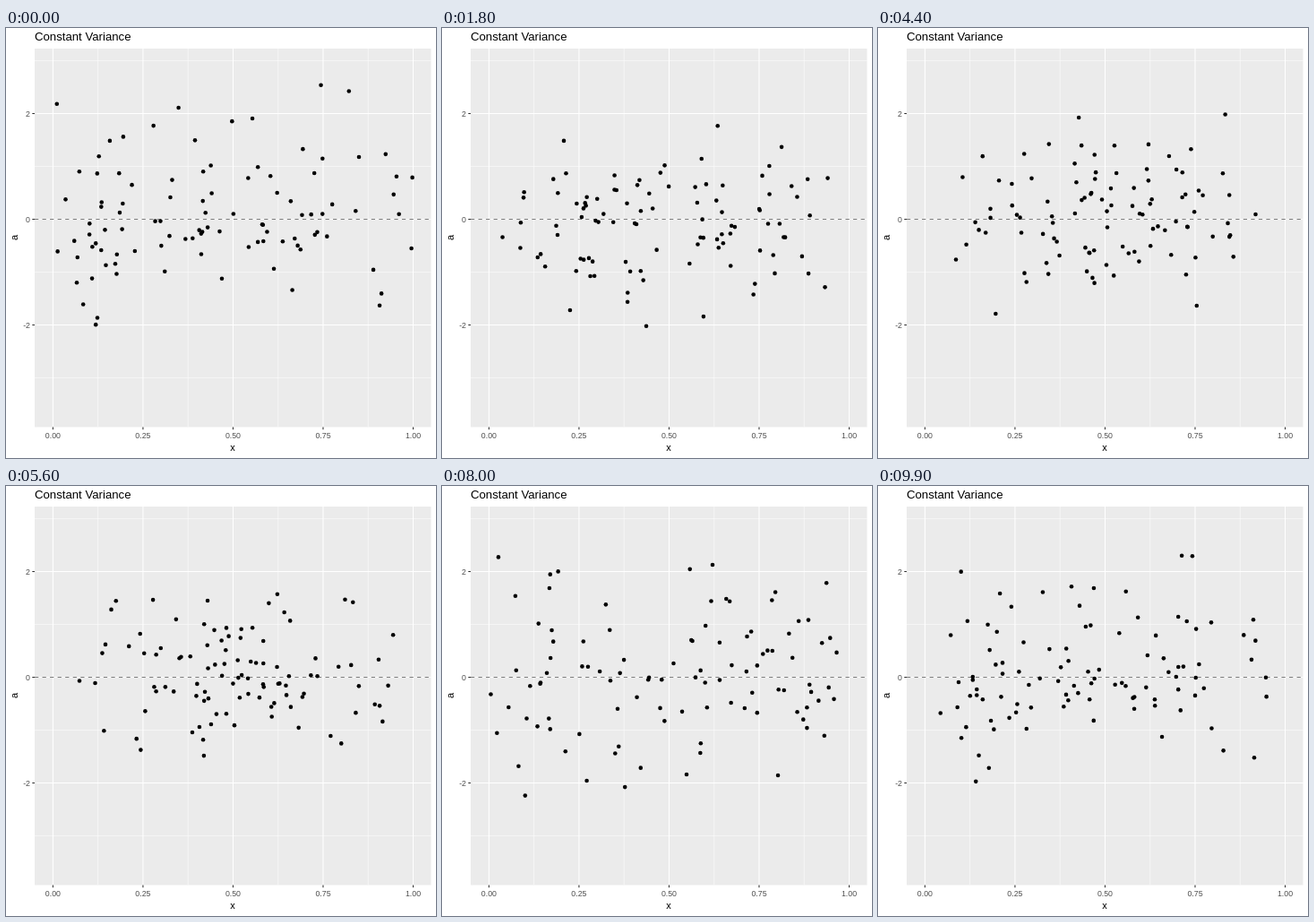
Recreate the animation shown at these times as an HTML page with a canvas. Size 480 px wide and 480 px high, loop 10 s.

```html
<!DOCTYPE html>
<html lang="en">
<head>
<meta charset="utf-8">
<title>Constant Variance</title>
<style>
  html, body { margin: 0; width: 100%; height: 100%; overflow: hidden; background: #fff; }
  canvas { display: block; }
</style>
</head>
<body>
<canvas id="plot" width="480" height="480"></canvas>
<script>
const ctx = document.getElementById('plot').getContext('2d');
const POINTS = 100, STATES = 10, FRAME_MS = 100, FRAMES = 100;
const panel = { left: 32, top: 23, right: 474.5, bottom: 445.5 };
const px = x => 52.4 + 402.1 * x;
const py = y => 213.5 - 59 * y;

let seed = 20177;
const random = () => (seed = seed * 16807 % 2147483647) / 2147483647;
const normal = () => Math.sqrt(-2 * Math.log(random())) * Math.cos(2 * Math.PI * random());

// Each state is a fresh sample: uniform in x, standard normal in y
const clamp = y => Math.max(-3.6, Math.min(2.9, y));
const sample = () => Array.from({ length: POINTS }, () => [px(random()), py(clamp(normal()))]);
const states = Array.from({ length: STATES }, sample);

function line(x1, y1, x2, y2, color, width = 1.07) {
  ctx.strokeStyle = color;
  ctx.lineWidth = width;
  ctx.beginPath();
  ctx.moveTo(x1, y1);
  ctx.lineTo(x2, y2);
  ctx.stroke();
}

function text(label, x, y, size, color, align) {
  ctx.font = `${size}px "Liberation Sans", Arial, sans-serif`;
  ctx.fillStyle = color;
  ctx.textAlign = align;
  ctx.fillText(label, x, y);
}

function drawAxes() {
  const { left, top, right, bottom } = panel;
  const vertical = (x, width) => line(px(x), top, px(x), bottom, '#fff', width);
  const horizontal = (y, width) => line(left, py(y), right, py(y), '#fff', width);

  ctx.fillStyle = '#fff';
  ctx.fillRect(0, 0, 480, 480);
  ctx.fillStyle = '#ebebeb';
  ctx.fillRect(left, top, right - left, bottom - top);

  for (let x = 0.125; x < 1; x += 0.25) vertical(x, 0.53);
  for (let y = -3; y <= 3; y += 2) horizontal(y, 0.53);
  for (let x = 0; x <= 1; x += 0.25) {
    vertical(x);
    line(px(x), bottom, px(x), bottom + 2.7, '#333');
    text(x.toFixed(2), px(x), 458, 8.8, '#4d4d4d', 'center');
  }
  for (let y = -2; y <= 2; y += 2) {
    horizontal(y);
    line(left - 2.7, py(y), left, py(y), '#333');
    text(y, 27, py(y) + 3.2, 8.8, '#4d4d4d', 'right');
  }

  ctx.setLineDash([4.27, 4.27]);
  line(left, py(0), right, py(0), '#7f7f7f');
  ctx.setLineDash([]);

  text('Constant Variance', 32, 14, 13.2, '#000', 'left');
  text('x', 253, 472, 11, '#000', 'center');
  ctx.save();
  ctx.translate(13, 234);
  ctx.rotate(-Math.PI / 2);
  text('a', 0, 0, 11, '#000', 'center');
  ctx.restore();
}

function draw(now) {
  const frame = Math.floor(now / FRAME_MS) % FRAMES;
  const k = Math.max(0, Math.ceil(frame / 10) - 1);
  // Later states rest for one extra frame before moving on
  const t = k === 0 ? frame / 10 : (frame - 10 * k - 1) / 9;
  const from = states[k], to = states[(k + 1) % STATES];

  drawAxes();
  ctx.fillStyle = '#000';
  from.forEach(([x, y], i) => {
    const [toX, toY] = to[i];
    ctx.beginPath();
    ctx.arc(x + (toX - x) * t, y + (toY - y) * t, 2.3, 0, 2 * Math.PI);
    ctx.fill();
  });
}

const start = performance.now();
function tick() {
  draw(performance.now() - start);
  requestAnimationFrame(tick);
}
tick();
</script>
</body>
</html>
```
